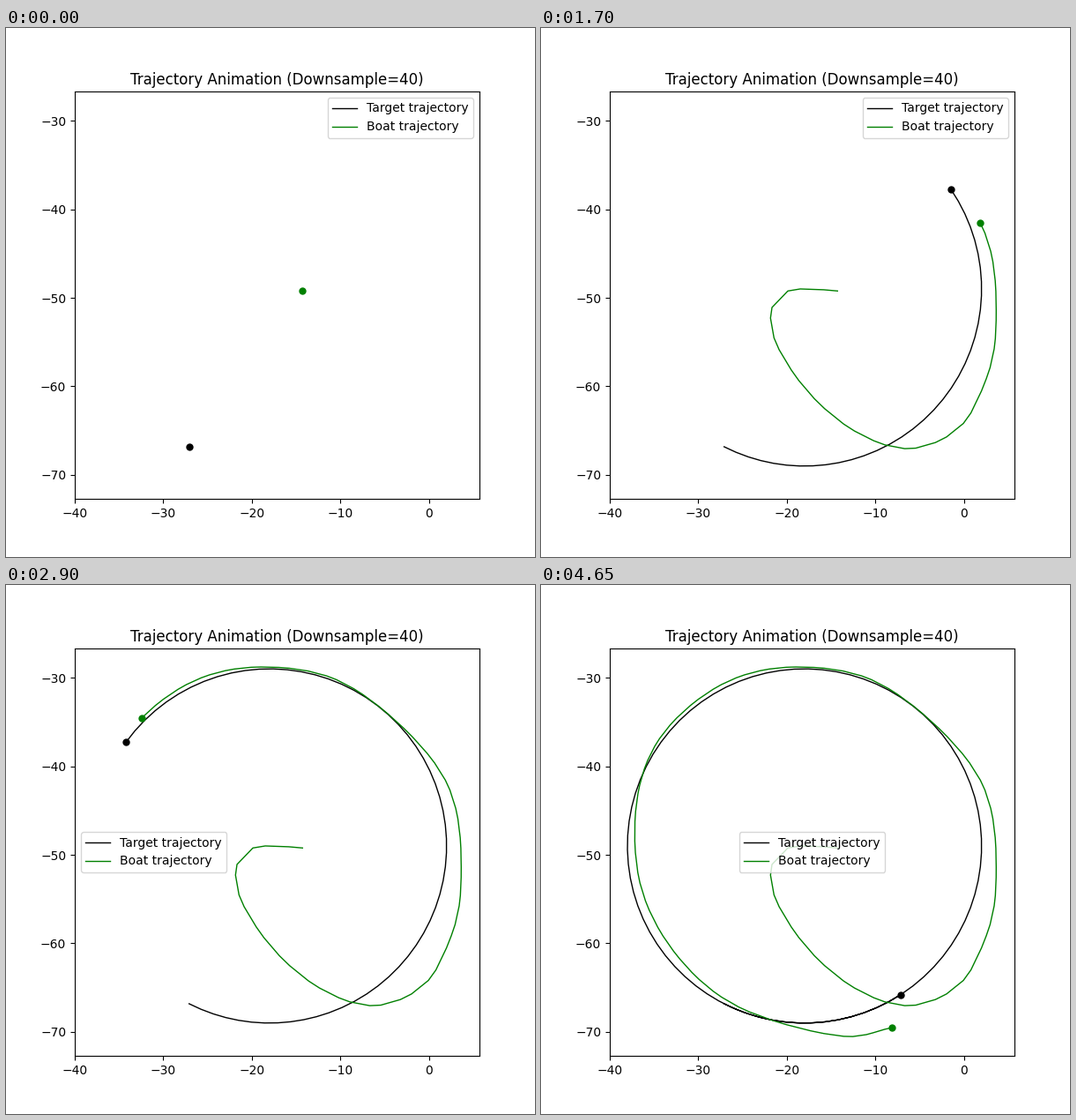
Recreate the animation shown at these times as a matplotlib script. Size 600 px wide and 600 px high, loop 4.7 s.

```python
import numpy as np
import matplotlib.pyplot as plt
from matplotlib.animation import FuncAnimation

FRAMES = 94
STEP_MS = 50
CENTER = (-18, -49)
RADIUS = 20
frames = np.arange(FRAMES)


def target_path():
    """Circle run at a slightly varying angular speed."""
    degrees = np.interp(frames, [0, 11, 49, 77, 93],
                        [-117, -70.4, 102.4, 232.2, 302.9])
    angle = np.radians(degrees)
    return (CENTER[0] + RADIUS * np.cos(angle),
            CENTER[1] + RADIUS * np.sin(angle))


def smooth(t, keys, values):
    """Cubic Hermite curve through the key values."""
    slopes = np.gradient(values, keys)
    k = np.clip(np.searchsorted(keys, t, side="right") - 1, 0, len(keys) - 2)
    span = keys[k + 1] - keys[k]
    u = (t - keys[k]) / span
    rise = values[k + 1] - values[k]
    ease = u * u * (3 - 2 * u)
    bend = u * (1 - u) * ((1 - u) * slopes[k] - u * slopes[k + 1])
    return values[k] + rise * ease + span * bend


# Key poses of the boat: frame, x, y
BOAT = np.array([
    (0, -14.27, -49.23), (2, -18.48, -49.0), (3, -19.88, -49.23),
    (4, -21.67, -51.09), (5, -21.84, -52.29), (9, -18.63, -59.36),
    (13, -12.36, -65.04), (17, -5.44, -66.98), (20, -0.06, -64.19),
    (23, 2.53, -59.14), (28, 3.65, -51.39), (34, 1.86, -41.57),
    (39, -4.59, -34.12), (43, -10.42, -30.23), (48, -18.98, -28.79),
    (54, -27.39, -30.78), (60, -34.36, -36.86), (66, -37.07, -45.07),
    (71, -36.58, -53.19), (77, -32.07, -61.78), (82, -25.45, -67.18),
    (88, -13.57, -70.5), (93, -8.12, -69.52),
])


def boat_path():
    """Short and long strides take turns; the order flips on the middle leg."""
    long_stride = (frames % 2 == 0) ^ ((frames > 23) & (frames < 46))
    clock = np.cumsum(np.where(long_stride, 1.75, 1.0))
    keys = clock[BOAT[:, 0].astype(int)]
    return smooth(clock, keys, BOAT[:, 1]), smooth(clock, keys, BOAT[:, 2])


def legend_place(i):
    """Free spot for the legend as the paths fill the axes."""
    for end, place in ((40, "upper right"), (50, "upper left"),
                       (65, "center left"), (91, "lower right")):
        if i < end:
            return place
    return "center"


fig, ax = plt.subplots(figsize=(6, 6), dpi=100)
ax.set_xlim(-40, 5.72)
ax.set_ylim(-72.7, -26.7)
ax.set_aspect("equal", adjustable="box")
ax.set_title("Trajectory Animation (Downsample=40)")

tracks = []
for path, color, label in ((target_path(), "black", "Target trajectory"),
                           (boat_path(), "green", "Boat trajectory")):
    line, = ax.plot([], [], color=color, lw=1, label=label)
    dot, = ax.plot([], [], "o", color=color, ms=5)
    tracks.append((*path, line, dot))
legend = ax.legend(loc="upper right")


def update(i):
    for x, y, line, dot in tracks:
        line.set_data(x[:i + 1], y[:i + 1])
        dot.set_data(x[i:i + 1], y[i:i + 1])
    legend.set_loc(legend_place(i))
    return []


anim = FuncAnimation(fig, update, frames=FRAMES, interval=STEP_MS,
                     repeat=True, repeat_delay=0, blit=False)
plt.show()
```
